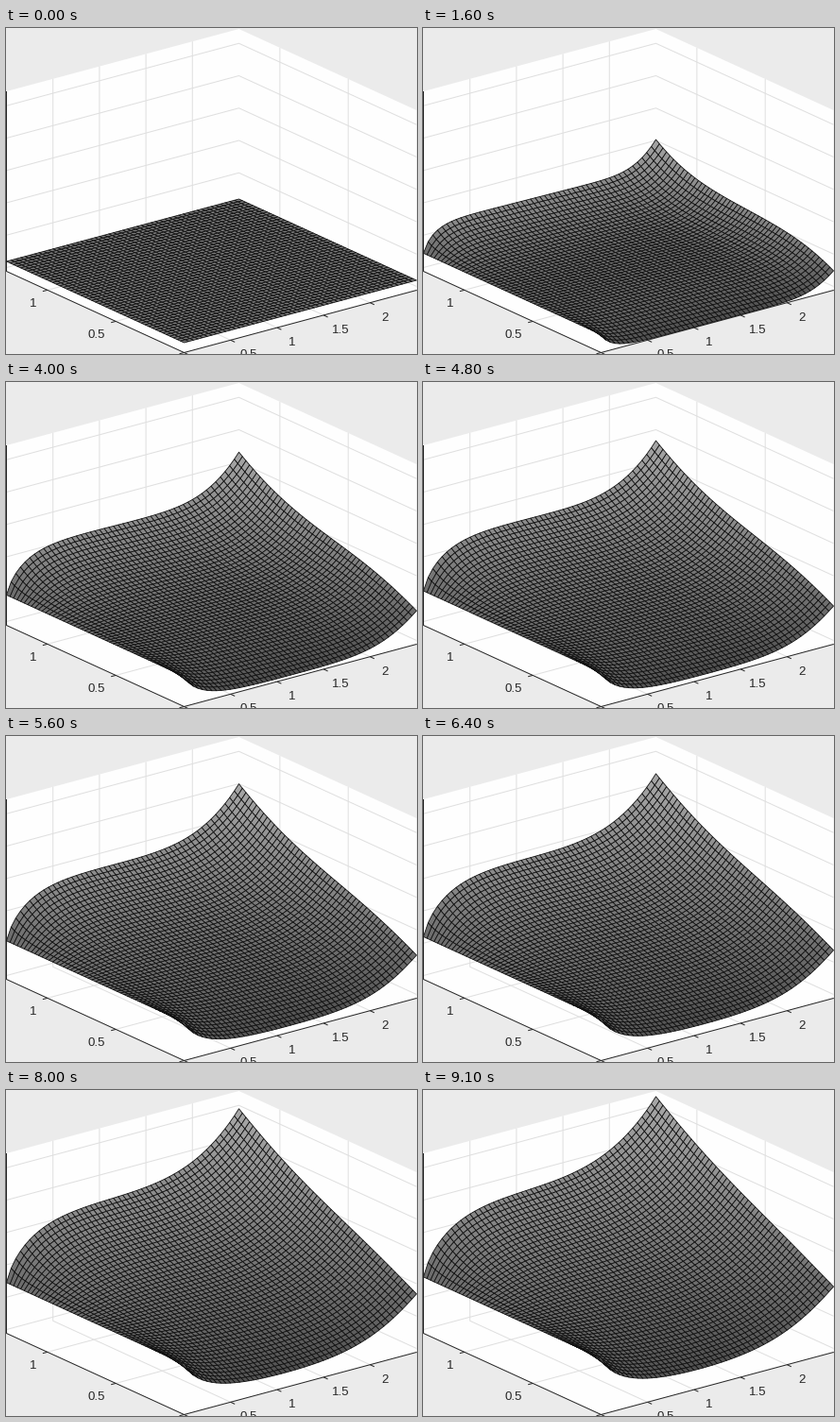
A matplotlib script for the animation above (9.2 s loop, 435 px wide and 345 px high).

```python
import numpy as np
import matplotlib.pyplot as plt
from matplotlib.animation import FuncAnimation
from matplotlib.collections import LineCollection, PolyCollection

W, H, DPI = 435, 345, 96
PX = 72 / DPI
FRAMES, INTERVAL = 92, 100
X_MAX, Y_MAX = 2.5, 1.3
N = 50
BOX_HEIGHT, REST = 190.5, 10.5
INK = "#262626"


def project(x, y, z=0):
    """Orthographic view; z is the height in pixels above the box floor."""
    u, v = np.asarray(x) / X_MAX, np.asarray(y) / Y_MAX
    return np.stack(np.broadcast_arrays(188 + 246 * u - 188 * v,
                                        343 - 66 * u - 86 * v - z), axis=-1)


def simulate():
    """Heated plate: uniform source, clamped x=0 edge, heat flux on the others."""
    diffusion, source, dt, substeps = 0.025, 5.4, 0.005, 20
    dx, dy = X_MAX / N, Y_MAX / N
    unit = np.linspace(0, 1, N + 1)
    to_slope = np.sqrt(np.pi / diffusion) / 2
    far = (22.5 - 2.5 * unit) * to_slope
    near = 14.6 * to_slope
    right = (15 + 8.7 * unit) * to_slope
    w = np.zeros((N + 1, N + 1))
    states = []
    for k in range(FRAMES):
        states.append(w + source * k * dt * substeps)
        for _ in range(substeps):
            rows = np.vstack([w[1] - 2 * dy * near, w, w[-2] + 2 * dy * far])
            cols = np.column_stack([w[:, 1], w, w[:, -2] + 2 * dx * right])
            lap = ((rows[2:] - 2 * w + rows[:-2]) / dy ** 2
                   + (cols[:, 2:] - 2 * w + cols[:, :-2]) / dx ** 2)
            w = w + dt * diffusion * lap
            w[:, 0] = 0
    return states


states = simulate()
gx, gy = np.meshgrid(np.linspace(0, X_MAX, N + 1), np.linspace(0, Y_MAX, N + 1))

fig = plt.figure(figsize=(W / DPI, H / DPI), dpi=DPI, facecolor="#ebebeb")
ax = fig.add_axes([0, 0, 1, 1])
ax.set_xlim(-0.5, W - 0.5)
ax.set_ylim(H - 0.5, -0.5)
ax.axis("off")


def draw_box():
    outline = project([0, X_MAX, X_MAX, X_MAX, 0, 0],
                      [0, 0, 0, Y_MAX, Y_MAX, Y_MAX],
                      [0, 0, BOX_HEIGHT, BOX_HEIGHT, BOX_HEIGHT, 0])
    ax.add_patch(plt.Polygon(outline, fc="#fefefe", ec="none", zorder=0))

    grid = []
    for x in (0.5, 1, 1.5, 2):
        grid.append(project([x] * 3, [0, Y_MAX, Y_MAX], [0, 0, BOX_HEIGHT]))
    for y in (0.5, 1):
        grid.append(project([0, X_MAX, X_MAX], [y] * 3, [0, 0, BOX_HEIGHT]))
    for z in 4 + 34.25 * np.arange(6):
        grid.append(project([0, X_MAX, X_MAX], [Y_MAX, Y_MAX, 0], z))
    ax.add_collection(LineCollection(grid, colors="#dfdfdf", linewidths=PX, zorder=1))


def draw_axes():
    lines = [project([0, 0, 0, X_MAX], [Y_MAX, Y_MAX, 0, 0], [BOX_HEIGHT, 0, 0, 0])]
    for x in np.arange(0, 2.6, 0.5):
        p = project(x, 0)
        lines.append([p, p + (4.5, 2.1)])
    for y in (0, 0.5, 1):
        p = project(0, y)
        lines.append([p, p + (-5, 1.3)])
    ax.add_collection(LineCollection(lines, colors=INK, linewidths=PX, zorder=2))

    def label(text, anchor, offset):
        cx, cy = anchor + np.array(offset)
        ax.text(cx, cy, text, family="Liberation Sans", size=13.3 * PX,
                color=INK, ha="center", va="center_baseline", zorder=4)

    for x in (0.5, 1, 1.5, 2):
        label(f"{x:g}", project(x, 0), (16 + 2.5 * (x % 1 > 0), 14.5))
    for y in (0.5, 1):
        label(f"{y:g}", project(0, y), (-15.5 - 5 * (y % 1 > 0), 13.5))


draw_box()
draw_axes()
surface = PolyCollection([], edgecolors="#101010", linewidths=0.82 * PX, zorder=3)
ax.add_collection(surface)


def update(k):
    z = states[k]
    p = project(gx, gy, z + REST)
    quads = np.stack([p[:-1, :-1], p[:-1, 1:], p[1:, 1:], p[1:, :-1]], axis=2)
    # far cells first, so that near ones cover them
    surface.set_verts(quads[::-1, ::-1].reshape(-1, 4, 2))
    span = np.ptp(z)
    level = (z - z.min()) / span if span else np.full_like(z, 0.4)
    shade = (80 + 90 * level[:-1, :-1] ** 0.8) / 255
    surface.set_facecolor(np.repeat(shade[::-1, ::-1].reshape(-1, 1), 3, axis=1))
    return surface,


anim = FuncAnimation(fig, update, frames=FRAMES, interval=INTERVAL,
                     repeat=True, repeat_delay=0)
plt.show()
```
